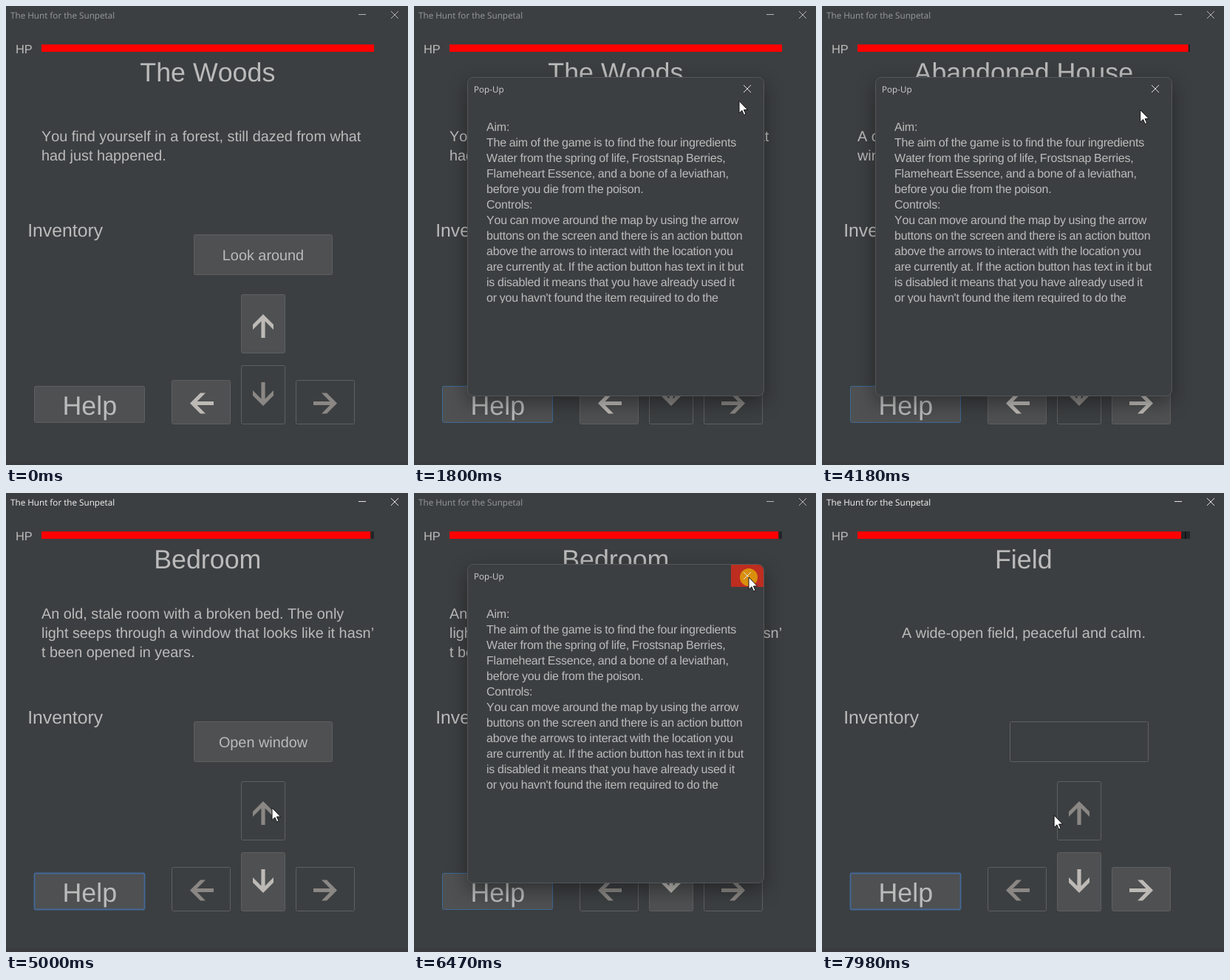
Recreate the animation shown at these times as an HTML page. Size 544 by 621 pixels, loop 8000 ms.

```html
<!DOCTYPE html>
<html lang="en">
<head>
<meta charset="utf-8">
<title>Text adventure</title>
<style>
  html, body { margin: 0; width: 100%; height: 100%; overflow: hidden; background: #3c3f41; }
  svg { display: block; width: 544px; height: 621px; }
  text {
    font-family: "Liberation Sans", Arial, sans-serif; fill: #bbb;
    font-kerning: none; white-space: pre; text-rendering: geometricPrecision;
  }
  .bar { font-family: "Open Sans", "Noto Sans", sans-serif; font-size: 11.7px; }
  .mid { text-anchor: middle; }
  .h1 { font-size: 35.8px; }
  .body { font-size: 19.85px; }
  .note { font-size: 16px; letter-spacing: -.2px; word-spacing: -.4px; }
  .icon { fill: none; stroke: #b4b5b6; stroke-width: 1; }
  .btn rect { fill: #3c3f41; stroke: #5e6060; }
  .btn path { fill: #8a8784; }
  .btn.on rect { fill: #4e5051; }
  .btn.on path { fill: #bdbab6; }
  .btn.hover rect { fill: #545759; stroke: #43699a; }
  .btn.down rect { fill: #5d5f62; }
  .btn.focus rect { stroke: #3f6896; }
  .active .btn.focus rect { stroke: #43699a; stroke-width: 1.8; }
  #name { fill: #989a9b; }
  .active #name { fill: #f4f4f4; }
  .active #frame { stroke: #e4e4e4; }
  .sheet { fill: #3c3f41; stroke: #54575a; filter: drop-shadow(0 9px 13px rgba(0, 0, 0, .38)); }
</style>
</head>
<body>
<svg id="stage" viewBox="0 0 544 621">
  <defs>
    <clipPath id="view"><rect x="90" y="140" width="370" height="262"/></clipPath>
  </defs>
  <rect width="544" height="621" fill="#3c3f41"/>
  <rect y="616" width="544" height="5" fill="#393b3e"/>
  <text id="name" class="bar" x="6" y="17">The Hunt for the Sunpetal</text>
  <path id="frame" class="icon" d="M477 11.5h10M521 7l10 10m0-10l-10 10"/>

  <text x="13" y="64" font-size="16.4">HP</text>
  <rect x="48" y="52" width="450" height="10" fill="#232628"/>
  <rect x="491" y="52" width="1.5" height="10" fill="#0e0f10"/>
  <rect id="hp" x="48" y="52" width="450" height="10" fill="#f00"/>

  <text id="place" class="h1 mid" x="272.8" y="102"></text>
  <g id="story" class="body"></g>
  <text x="29.2" y="312" font-size="24.8">Inventory</text>
  <g id="buttons"></g>

  <g id="popup">
    <rect class="sheet" x="72.5" y="96.5" width="401" height="431" rx="8"/>
    <path id="hot" d="M429 97h36a8 8 0 0 1 8 8v22h-44z" fill="#bd2d20"/>
    <text class="bar" x="81" y="117" style="fill:#d0d0d0">Pop-Up</text>
    <g id="help-text" class="note" clip-path="url(#view)"></g>
  </g>
  <circle id="ring" r="12" fill="#e0a808" fill-opacity=".8"/>
  <path id="cross" class="icon" style="stroke:#e0e0e0" d="M446 107l10 10m0-10l-10 10"/>
  <path id="cursor" d="M0 0V16.5L3.9 12.9L6.5 18.9L9 17.8L6.4 12H11.6Z" fill="#fff" stroke="#111" stroke-width="1"/>
</svg>
<script>
const LOOP = 8000;
const $ = id => document.getElementById(id);

const places = {
  woods: { title: "The Woods", action: "Look around", exits: "up left",
    text: ["You find yourself in a forest, still dazed from what", "had just happened."] },
  house: { title: "Abandoned House", action: "Look around", exits: "up left right",
    text: ["A crumbling, lonely old house with shattered", "windows and a front door that hangs wide open."] },
  bedroom: { title: "Bedroom", action: "Open window", exits: "down",
    text: ["An old, stale room with a broken bed. The only",
      "light seeps through a window that looks like it hasn’", "t been opened in years."] },
  field: { title: "Field", action: "", exits: "down right",
    text: ["A wide-open field, peaceful and calm."] }
};

const helpLines = [
  "Aim:",
  "The aim of the game is to find the four ingredients",
  "Water from the spring of life, Frostsnap Berries,",
  "Flameheart Essence, and a bone of a leviathan,",
  "before you die from the poison.",
  "Controls:",
  "You can move around the map by using the arrow",
  "buttons on the screen and there is an action button",
  "above the arrows to interact with the location you",
  "are currently at. If the action button has text in it but",
  "is disabled it means that you have already used it",
  "or you havn't found the item required to do the"
];

// Button: x, y, width, height
const boxes = {
  action: [254, 309, 188, 55],
  help: [38, 514, 150, 50],
  up: [318, 390, 60, 80],
  left: [224, 506, 80, 60],
  down: [318, 486, 60, 80],
  right: [392, 506, 80, 60]
};
// Arrow: centre x, centre y, angle
const arrows = { up: [348, 433, 0], left: [265, 537.5, -90], down: [348, 525, 180], right: [432, 537.5, 90] };

// Timeline in ms
const visits = [[0, "woods"], [2810, "house"], [4800, "bedroom"], [6890, "house"], [7270, "woods"], [7710, "field"]];
const popups = [[1170, 2000], [3370, 4480], [5770, 6550]];
const clicks = [1080, 1950, 2780, 3290, 4420, 4770, 5680, 6440, 6860, 7240, 7680];
const PRESS = 110;
// Pointer move: start, end, x, y, bend
const moves = [
  [190, 930, 102, 535, -160],
  [1330, 1860, 452, 114, 0],
  [2060, 2700, 266, 543, 0],
  [2880, 3240, 138, 544, 0],
  [3570, 4290, 450, 114, 0],
  [4500, 4720, 360, 426, 0],
  [5200, 5620, 130, 545, 0],
  [5980, 6410, 453, 114, 0],
  [6580, 6820, 350, 537, 0],
  [6960, 7190, 430, 540, 0],
  [7340, 7620, 348, 438, 0],
  [7830, 7985, 314, 436, 0]
];

const line = (s, x, y, cls = "") => `<text x="${x}" y="${y}" class="${cls}">${s}</text>`;
const clamp = v => Math.max(0, Math.min(1, v));
const smooth = u => u * u * (3 - 2 * u);

$("buttons").innerHTML = Object.entries(boxes).map(([id, [x, y, w, h]]) => {
  let face = "";
  if (id === "help") face = line("Help", 113.3, 553, "h1 mid");
  if (id === "action") face = `<text id="label" class="body mid" x="348" y="344"></text>`;
  if (arrows[id]) {
    const [cx, cy, turn] = arrows[id];
    face = `<path transform="translate(${cx} ${cy}) rotate(${turn})"
      d="M0-16L14-2V5L2.6-6.4V16H-2.6V-6.4L-14 5V-2Z"/>`;
  }
  return `<g id="${id}" class="btn"><rect x="${x + .5}" y="${y + .5}" width="${w - 1}" height="${h - 1}" rx="2"/>${face}</g>`;
}).join("");
$("help-text").innerHTML = helpLines.map((s, i) => line(s, 98, 169 + 21 * i)).join("");

function pointer(t) {
  let x = 472, y = 626;
  for (const [a, b, tx, ty, bend] of moves) {
    if (t < a) break;
    const u = smooth(clamp((t - a) / (b - a)));
    x += (tx - x) * u;
    y += (ty - y) * u + 2 * u * (1 - u) * bend;
  }
  return [x, y];
}

const inside = ([x, y, w, h], px, py) => px >= x && px < x + w && py >= y && py < y + h;

let shown = -1;
function enter(step) {
  shown = step;
  const { title, text, action } = places[visits[step][1]];
  const top = 196 - 13 * (text.length - 1);
  $("place").textContent = title;
  $("label").textContent = action;
  $("story").innerHTML = text.length === 1
    ? line(text[0], 273, top, "mid")
    : text.map((s, i) => line(s, 48, top + 26 * i)).join("");
  $("hp").setAttribute("width", 450 - 2.4 * step);
}

function drawPopup(t) {
  const span = popups.find(([a, b]) => t >= a && t < b + 120);
  let scale = 1, alpha = 0;
  if (span) {
    const p = clamp((t - span[0]) / 200), out = clamp((t - span[1]) / 120);
    scale = .9 + .1 * (1 - (1 - p) ** 3) - .07 * out;
    alpha = clamp(.2 + p * 4) * (1 - out);
  }
  const zoom = `translate(215 260) scale(${scale}) translate(-215 -260)`;
  for (const id of ["popup", "cross"]) {
    $(id).setAttribute("transform", zoom);
    $(id).style.opacity = alpha;
  }
}

function draw(t) {
  const step = visits.filter(v => v[0] <= t).length - 1;
  if (step !== shown) enter(step);

  const { exits, action } = places[visits[step][1]];
  const [x, y] = pointer(t);
  const modal = popups.some(([a, b]) => t >= a && t < b);
  const pressed = clicks.some(c => t >= c && t < c + PRESS);
  const enabled = id => id === "action" ? action !== "" : id === "help" || exits.includes(id);
  const over = Object.keys(boxes).find(id => inside(boxes[id], x, y) && enabled(id));
  const live = modal ? null : over;
  const focus = t < clicks[0] ? null : pressed && live ? live : "help";

  $("stage").classList.toggle("active", t >= clicks[0] && !modal);
  for (const id in boxes) {
    const c = $(id).classList;
    c.toggle("on", enabled(id));
    c.toggle("hover", id === live);
    c.toggle("down", id === live && pressed);
    c.toggle("focus", id === focus);
  }

  drawPopup(t);
  $("hot").style.visibility = modal && inside([429, 97, 44, 30], x, y) ? "visible" : "hidden";
  $("ring").style.visibility = pressed ? "visible" : "hidden";
  const at = `translate(${x.toFixed(1)} ${y.toFixed(1)})`;
  $("ring").setAttribute("transform", at);
  $("cursor").setAttribute("transform", at);
}

const start = performance.now();
function tick() {
  draw((performance.now() - start) % LOOP);
  requestAnimationFrame(tick);
}
tick();
</script>
</body>
</html>
```
